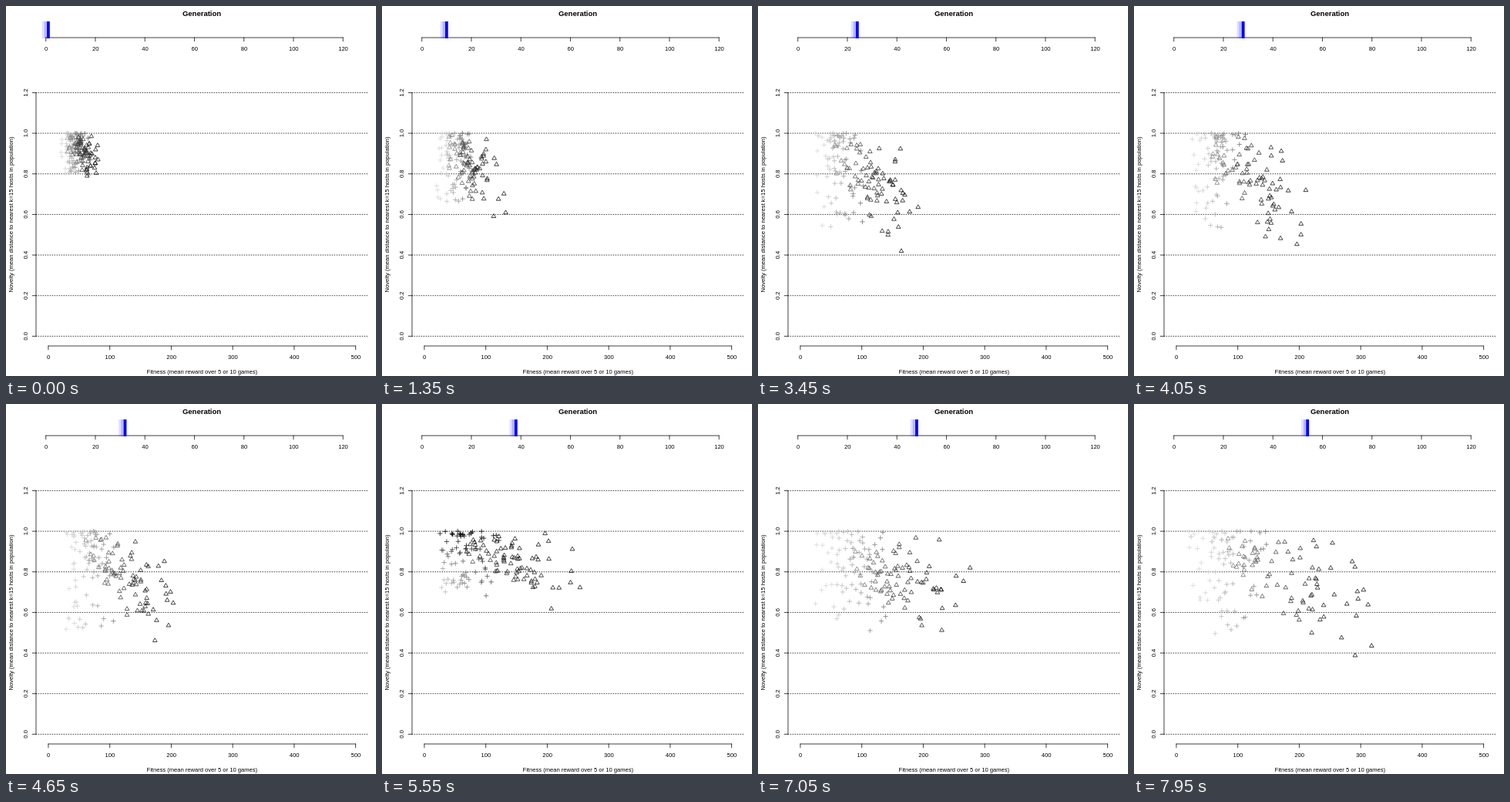
Animation of 480 by 480 pixels, one loop 8 s. Source, as an HTML page:

```html
<!DOCTYPE html>
<html lang="en">
<head>
<meta charset="utf-8">
<title>Generation</title>
<style>
html, body { margin: 0; width: 100%; height: 100%; overflow: hidden; background: #fff; }
svg { display: block; width: 100vw; height: 100vh; }
text { font: 7.6px "Liberation Sans", Arial, sans-serif; text-anchor: middle; }
.title { font-size: 9.5px; font-weight: bold; }
path { fill: none; stroke: #000; stroke-width: .75; stroke-linecap: round; stroke-linejoin: round; }
.dots { stroke-dasharray: .75 2.25; }
</style>
</head>
<body>
<svg viewBox="0 0 480 480"><g id="axes"></g><g id="bars"></g><g id="points"></g></svg>
<script>
const STEP = 150, LOOP = 8000, CROSSES = 78, TRIANGLES = 78;
const LEFT = 38.97, RIGHT = 469.5, BOTTOM = 441.03, TICK = 4.75;
const NOVELTY_PEAK = 38; // around this generation novelty outweighs fitness
const genX = g => 51.7 + g * 3.2125;
const fitX = f => 54.92 + f * 0.7974;
const novY = v => 428.39 - v * 263.3;
const byId = id => document.getElementById(id);

function random(seed) {
  let s = Math.imul(seed + 1, 0x9E3779B1);
  return () => {
    s = s + 0x6D2B79F5 | 0;
    let t = Math.imul(s ^ s >>> 15, 1 | s);
    t = t + Math.imul(t ^ t >>> 7, 61 | t) ^ t;
    return ((t ^ t >>> 14) >>> 0) / 2 ** 32;
  };
}

// The cloud spreads to the right and sinks as the generations pass.
function population(g) {
  const bias = Math.max(0, 1 - Math.abs(g - NOVELTY_PEAK) / 4);
  const reach = 125 + 3.3 * g;
  const depth = (.22 + .38 * (1 - Math.exp(-g / 12))) * (1 - .35 * bias);
  const start = 74 + .25 * (reach - 122);
  const list = [];
  for (let i = 0; i < CROSSES; i++) {
    const r = random(g * 1000 + i), u = ((r() + r()) / 2) ** 1.2;
    const x = 70 + (18 + .4 * (reach - 70)) * u;
    list.push({ x, v: 1 - depth * .85 * r() ** 2, cross: true });
  }
  for (let i = 0; i < TRIANGLES; i++) {
    // Selected individuals stay for three generations.
    const r = random(Math.floor((g + i) / 3) * 1000 + 500 + i);
    const u = 1.1 * ((r() + r()) / 2) ** 1.3;
    const x = start + (reach - start) * u;
    list.push({ x, v: 1 - depth * (.35 + .8 * u) * .55 * (r() + r()) });
  }
  for (const p of list) {
    const u = Math.max(0, (p.x - 70) / (reach - 70));
    const s = Math.min(1, u + .9 * bias * Math.max(0, (p.v - .7) / .3) ** 2.5);
    const pale = p.cross ? 45 * (1 - bias) : 0;
    p.shade = Math.min(212, Math.round(205 * (1 - s) ** 1.8 + pale));
  }
  return list.sort((p, q) => q.shade - p.shade);
}

function mark({ x, v, cross, shade }) {
  const y = novY(v);
  const d = cross
    ? `M${x - 2.77} ${y}h5.54M${x} ${y - 2.77}v5.54`
    : `M${x} ${y - 3.02}l2.64 4.54h-5.28z`;
  return `<path d="${d}" style="stroke:rgb(${shade},${shade},${shade})"/>`;
}

function drawAxes() {
  let out = "";
  const line = (d, c = "") => out += `<path class="${c}" d="${d}"/>`;
  const label = (x, y, s, c = "") => out += `<text class="${c}" x="${x}" y="${y}">${s}</text>`;
  const upright = (x, y, s) =>
    out += `<text transform="translate(${x} ${y}) rotate(-90)">${s}</text>`;
  const across = (pos, y, max, step) => {
    line(`M${pos(0)} ${y}H${pos(max)}`);
    for (let n = 0; n <= max; n += step) {
      line(`M${pos(n)} ${y}v${TICK}`);
      label(pos(n) + .3, y + 17, n);
    }
  };
  across(genX, 41.03, 120, 20);
  across(fitX, BOTTOM, 500, 100);
  line(`M${LEFT} ${novY(0)}V${novY(1.2)}`);
  for (let i = 0; i <= 6; i++) {
    const y = novY(i / 5);
    line(`M${LEFT} ${y}h${-TICK}`);
    line(`M${LEFT} ${y}H${RIGHT}`, "dots");
    upright(28, y, (i / 5).toFixed(1));
  }
  label(254, 13, "Generation", "title");
  label(254.3, 477, "Fitness (mean reward over 5 or 10 games)");
  upright(9, 270.5, "Novelty (mean distance to nearest k=15 hosts in population)");
  byId("axes").innerHTML = out;
}

function drawGeneration(g) {
  byId("bars").innerHTML = [.12, .28, 1].map((alpha, i) =>
    `<rect x="${genX(g - 2 + i) - 1.9}" y="20" width="3.8" height="22" fill="#00f" opacity="${alpha}"/>`).join("");
  byId("points").innerHTML = population(g).map(mark).join("");
}

let shown = 0;
function tick() {
  const g = 1 + Math.floor(performance.now() % LOOP / STEP);
  if (g !== shown) drawGeneration(shown = g);
  requestAnimationFrame(tick);
}
drawAxes();
tick();
</script>
</body>
</html>
```
